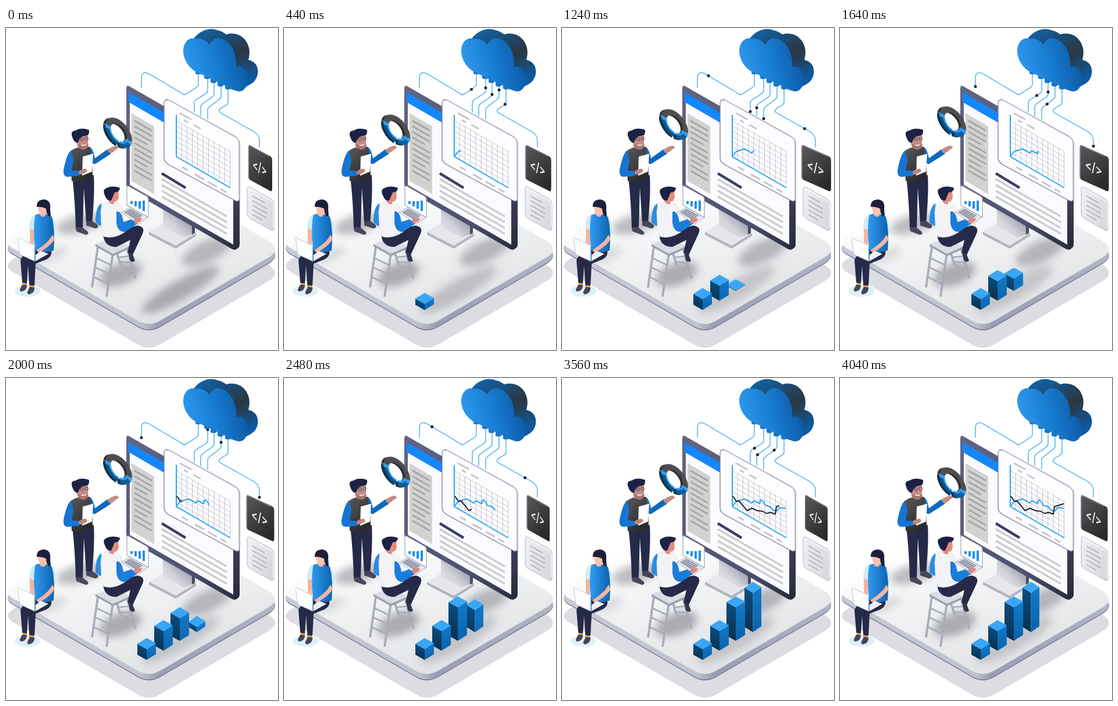
An HTML page for the animation above (4.08 s loop, 468x556 px).

```html
<!DOCTYPE html>
<html lang="en">
<head>
<meta charset="utf-8">
<title>Cloud analytics</title>
<style>
html, body { margin: 0; width: 100%; height: 100%; overflow: hidden; background: #fff; }
svg { display: block; width: 468px; height: 556px; }
.anim, .dot, .bar { animation: 4080ms linear infinite; }
.dot { fill: #1b1f2e; offset-rotate: 0deg; }
#ring { animation-name: bob; }
#card { animation-name: turn; transform-origin: 437.5px 240px; }
#castShadow { animation-name: fade; }
.plot { fill: none; stroke-width: 2; stroke-linejoin: round; stroke-dasharray: 100 110; }
#plotBlue { stroke: #2aa4f4; animation-name: drawBlue; }
#plotDark { stroke: #20222c; animation-name: drawDark; }
.wire { fill: none; stroke: #36a5ef; stroke-width: 1.3; }
@keyframes bob { 50% { transform: translateY(-24px); } }
@keyframes turn {
  0% { transform: scaleX(1); } 21.6% { transform: scaleX(1.17); }
  30.4%, 37% { transform: scaleX(1.24); } 49% { transform: scaleX(1.17); }
  60.8% { transform: scaleX(.97); } 76.5% { transform: scaleX(.8); }
  100% { transform: scaleX(1.14); }
}
@keyframes fade { 0% { opacity: .6; } 14%, 100% { opacity: .35; } }
@keyframes drawBlue { 0% { stroke-dashoffset: 101; } 76.5%, 100% { stroke-dashoffset: 0; } }
@keyframes drawDark { 0%, 43% { stroke-dashoffset: 101; } 92%, 100% { stroke-dashoffset: 0; } }
@keyframes grow1 {
  0%, 2.5% { transform: translateY(var(--h)); visibility: hidden; }
  2.51% { transform: translateY(var(--h)); visibility: visible; }
  17.2%, 100% { transform: none; visibility: visible; }
}
@keyframes grow2 {
  0%, 16% { transform: translateY(var(--h)); visibility: hidden; }
  16.01% { transform: translateY(var(--h)); visibility: visible; }
  34.8%, 100% { transform: none; visibility: visible; }
}
@keyframes grow3 {
  0%, 29.7% { transform: translateY(var(--h)); visibility: hidden; }
  29.71% { transform: translateY(var(--h)); visibility: visible; }
  58.3%, 100% { transform: none; visibility: visible; }
}
@keyframes grow4 {
  0%, 45.3% { transform: translateY(var(--h)); visibility: hidden; }
  45.31% { transform: translateY(var(--h)); visibility: visible; }
  73%, 100% { transform: none; visibility: visible; }
}
@keyframes outer {
  0%, 2.2% { offset-distance: 0%; } 40.7%, 49.8% { offset-distance: 100%; }
  88.2%, 100% { offset-distance: 0%; }
}
@keyframes innerA {
  0%, 2.5% { offset-distance: 0%; } 21.6% { offset-distance: 73%; } 30.4% { offset-distance: 98%; }
  49% { offset-distance: 14%; } 53%, 61% { offset-distance: 0%; }
  76.5% { offset-distance: 80%; } 82% { offset-distance: 100%; } 97%, 100% { offset-distance: 0%; }
}
@keyframes innerB {
  0%, 2.5% { offset-distance: 0%; } 22.5% { offset-distance: 94%; } 30.4% { offset-distance: 82%; }
  47%, 62% { offset-distance: 0%; } 76.5% { offset-distance: 62%; }
  84% { offset-distance: 100%; } 97%, 100% { offset-distance: 0%; }
}
@keyframes innerC {
  0%, 5% { offset-distance: 0%; } 21.6% { offset-distance: 62%; } 30.4% { offset-distance: 98%; }
  49% { offset-distance: 27%; } 57%, 61% { offset-distance: 0%; }
  76.5% { offset-distance: 98%; } 97%, 100% { offset-distance: 0%; }
}
</style>
</head>
<body>
<svg viewBox="0 0 468 556" xmlns="http://www.w3.org/2000/svg">
<defs>
  <linearGradient id="floor" x1=".2" y1="0" x2=".7" y2="1"><stop offset=".2" stop-color="#fff"/><stop offset=".55" stop-color="#eef0f1"/><stop offset="1" stop-color="#dfe1e4"/></linearGradient>
  <linearGradient id="slabSide"><stop offset="0" stop-color="#c9cad5"/><stop offset=".5" stop-color="#bfc1cd"/><stop offset=".56" stop-color="#9b9eb1"/><stop offset="1" stop-color="#b2b5c4"/></linearGradient>
  <linearGradient id="cloudFront" x1="0" y1=".6" x2="1" y2=".4"><stop offset="0" stop-color="#2f9bf0"/><stop offset=".45" stop-color="#1a80d6"/><stop offset="1" stop-color="#0a58a3"/></linearGradient>
  <linearGradient id="cloudBack" x1="0" y1="0" x2=".6" y2="1"><stop offset="0" stop-color="#0e68b4"/><stop offset=".35" stop-color="#1d4a70"/><stop offset=".6" stop-color="#2b3742"/><stop offset="1" stop-color="#0d5ba5"/></linearGradient>
  <linearGradient id="dark" x1="0" y1="0" x2=".6" y2="1"><stop offset="0" stop-color="#5a5a5c"/><stop offset="1" stop-color="#2a2a2d"/></linearGradient>
  <linearGradient id="note" x1="0" y1="0" x2="1" y2=".5"><stop offset="0" stop-color="#f1f1f4"/><stop offset="1" stop-color="#d9d9e0"/></linearGradient>
  <linearGradient id="neck" x1="1" y1="0" x2="0" y2="1"><stop offset="0" stop-color="#77788a"/><stop offset=".6" stop-color="#d2d2da"/><stop offset="1" stop-color="#ececf0"/></linearGradient>
  <linearGradient id="bezel" x1="0" y1="0" x2="1" y2="1"><stop offset="0" stop-color="#626684"/><stop offset=".7" stop-color="#4d5070"/><stop offset="1" stop-color="#262838"/></linearGradient>
  <linearGradient id="barSide" x1="0" y1="0" x2="0" y2="1"><stop offset="0" stop-color="#0a4d80"/><stop offset="1" stop-color="#09304e"/></linearGradient>
  <linearGradient id="barFront" x1="0" y1="0" x2="0" y2="1"><stop offset="0" stop-color="#1279cb"/><stop offset="1" stop-color="#0a63ab"/></linearGradient>
  <linearGradient id="vest"><stop offset="0" stop-color="#2f9bf0"/><stop offset="1" stop-color="#0f63b0"/></linearGradient>
  <filter id="soft" x="-40%" y="-60%" width="180%" height="220%"><feGaussianBlur stdDeviation="7"/></filter>
  <path id="slab" d="M18,384 L226,505 Q246,517 266,505 L452,396 Q474,382 452,368 L240,242 Q226,234 212,242 L18,355 Q-12,370 18,384Z"/>
</defs>

<!-- platform -->
<use href="#slab" y="41" fill="#dddce2"/>
<use href="#slab" y="11" fill="#6d7394"/>
<use href="#slab" y="9.5" fill="url(#slabSide)"/>
<use href="#slab" fill="url(#floor)"/>
<g fill="#808087" filter="url(#soft)">
  <ellipse cx="127" cy="338" rx="42" ry="16" opacity=".5" transform="rotate(-15 127 338)"/>
  <ellipse cx="197" cy="425" rx="38" ry="19" opacity=".6" transform="rotate(-20 197 425)"/>
  <ellipse cx="345" cy="386" rx="46" ry="18" opacity=".5" transform="rotate(-25 345 386)"/>
  <ellipse cx="80" cy="392" rx="28" ry="9" opacity=".25" transform="rotate(-25 80 392)"/>
  <ellipse id="castShadow" class="anim" cx="300" cy="452" rx="76" ry="17" transform-origin="300 452" style="rotate:-30deg"/>
</g>

<!-- monitor -->
<path d="M246,352 L283,330 L327,354 L292,376Z" fill="#e6e6ec"/>
<path d="M246,352 L292,376 L327,354 V359 L292,381 L246,357Z" fill="#b1b3c0"/>
<path d="M270,312 L320,341 V356 L306,362 L270,342Z" fill="url(#neck)"/>
<path d="M320,341 L325,344 V354 L320,357Z" fill="#4b4c60"/>
<path d="M211,100 L394,205 Q402,208 402,214 V374 Q402,380 394,383 Q390,383 386,380 L212,280 Q207,277 207,270 V106 Q207,98 211,100Z" fill="url(#bezel)"/>
<path d="M213,113 L391,216 V374 L213,271Z" fill="#fbfaff"/>
<path d="M211,111 L280,151 V168 L211,128Z" fill="#1487fa"/>
<path d="M216,147 L255,170 V287 L216,264Z" fill="#d2d2d1"/>
<g id="sideRows" stroke="#a3a3a4" stroke-width="2.6"/>
<g id="bodyRows" stroke="#cbcbcc" stroke-width="3.4"/>
<path d="M268,251 L309,276" stroke="#3b3f63" stroke-width="4.4"/>

<!-- floating chart -->
<path d="M272,131 Q272,121 281,124.500 L394,187 Q402,192 402,200 V292 Q402,302 394,298 L280,236 Q272,231 272,224Z" fill="#fdfdff" stroke="#70758f" stroke-width="1.2"/>
<path d="M276,126 Q278,123 283,126 L396,189 Q401,193 401,200 V294" fill="none" stroke="#bfc2d2" stroke-width="2"/>
<g stroke="#c6c6ca" stroke-width="3"><path d="M299,147 l20,11 M306,159 l7,4 M322,167 l13,7"/><path id="ticks"/></g>
<path id="grid" stroke="#adaeb8" stroke-width=".7"/>
<path d="M293,150 V222 L386,276" fill="none" stroke="#2aa4f4" stroke-width="2"/>
<path id="plotBlue" class="plot anim" pathLength="100" d="M293,222 L299,214 L306,211 L314,209 L322,213 L326,216 L330,212 L340,217 L342,210 L347,214 L350,220 L358,222 L364,229 L371,229 L374,224 L385,225"/>
<path id="plotDark" class="plot anim" pathLength="100" d="M294,204 L300,213 L304,212 L311,220 L313,222 L318,229 L327,225 L336,229 L345,230 L352,234 L359,232 L367,235 L369,222 L376,220 L385,217"/>

<!-- small cards -->
<path d="M415,278 Q415,272 420,275 L456,295 Q461,298 461,303 V346 Q461,352 456,349 L420,329 Q415,326 415,321Z" fill="url(#note)" stroke="#b4b6c3"/>
<path d="M418,281 Q418,276 423,279 L456,298 Q460,301 460,306 V344" fill="none" stroke="#f8f8fb" stroke-width="1.500"/>
<g id="noteRows" stroke="#b3b4ba" stroke-width="2"/>
<g id="wires"></g>
<g id="card" class="anim">
  <path d="M417,207 Q417,200.500 421,203 L454,221 Q458,223 458,228 V277 Q458,284 454,281 L421,263 Q417,261 417,256Z" fill="url(#dark)"/>
  <path d="M417.800,258 V208 Q417.800,202 422,204.500 L453,222" fill="none" stroke="#85858a"/>
  <text transform="matrix(.62 .33 0 1 436.500 249)" text-anchor="middle" font-family="Inter, 'Liberation Sans', sans-serif" font-size="23" font-weight="500" fill="#fff">&lt;/&gt;</text>
</g>
<g id="dots"></g>

<!-- cloud -->
<g id="plugs" fill="#1a75c9"/>
<path d="M322,20 C332,4 351,-2 364,4 C370,5 375,8 379,11 C396,6 412,15 417,31 C420,39 419,48 417,55 C430,58 435,68 433,80 C431,90 425,95 419,98 L399,109 L360,60Z" fill="url(#cloudBack)"/>
<path d="M305,40 C305,24 316,14 327,19 C336,17 345,22 350,29 C358,11 378,15 390,36 C395,46 397,58 396,68 C406,62 416,75 416,88 C416,102 408,112 398,109 C390,107 384,104 380,101 L330,77 C315,71 305,54 305,40Z" fill="url(#cloudFront)"/>

<!-- standing man -->
<path d="M114,256 L151,254 Q153,285 148,337 L138,337 L134,276 L132,347 L120,347 Q119,300 114,256Z" fill="#262a48"/>
<path d="M120,344 L131,344 L141,352 Q143,357 137,357 L121,351Z M138,334 L148,333 L158,340 Q160,346 153,346 L138,341Z" fill="#4a465a"/>
<path d="M141,205 Q149,204 153,225 L175,209 L181,217 L153,235 Q144,234 140,222Z" fill="#0f69bd"/>
<path d="M110,213 Q122,203 144,205 Q149,225 149,257 Q135,269 113,264Z" fill="url(#dark)"/>
<path d="M112,212 Q105,215 99,245 Q98,257 106,257 L126,255 L127,247 L113,246 L116,228Z" fill="#1675d2"/>
<path d="M132,222 L150,217 L148,248 L131,255Z" fill="#fff"/>
<path d="M125,248 q4,-5 13,-5 l2,4 q-6,6 -14,6Z" fill="#bd877c"/>
<path d="M122,186 H141 Q143,208 133,210 L124,207Z" fill="#c48c83"/>
<path d="M122,199 Q130,206 142,200 Q141,210 133,210 Q124,210 122,199Z" fill="#a9746e"/>
<path d="M130,202 q5,2 8,-1" stroke="#fff" stroke-width="1.500" fill="none"/>
<path d="M114,188 Q110,178 120,177 Q129,171 143,176 Q144,186 137,186 Q128,187 126,193 L123,199 Q116,196 114,188Z" fill="#1c2146"/>
<path d="M128,192 a2.700,2.700 0 1 0 5.400,0 a2.700,2.700 0 1 0 -5.400,0 M136,191 a2.700,2.700 0 1 0 5.400,0 a2.700,2.700 0 1 0 -5.400,0" fill="none" stroke="#463a48" stroke-width=".9"/>

<!-- ring chart -->
<g id="ring" class="anim"><g transform="matrix(1 .56 0 1 194 181)" fill="none" stroke-width="9">
  <g transform="translate(-4 3)"><path id="ringTopBack" stroke="#2c2c2f"/><path id="ringLeftBack" stroke="#07304c"/><path id="ringRightBack" stroke="#07304d"/></g>
  <path id="ringTop" stroke="#4e4e50"/><path id="ringLeft" stroke="#0d5388"/><path id="ringRight" stroke="#0f5c97"/>
  <g stroke="#2ba0f7"><path id="tipLeft"/><path id="tipRight"/><path id="rim" stroke-width="3"/></g>
</g></g>
<path d="M174,211 Q180,205 190,203 L195,206 L188,211 Q184,216 178,216Z" fill="#c48c83"/>

<!-- stool and seated man -->
<g fill="none" stroke="#a9abba" stroke-width="3.8">
  <path d="M190,386 L197,409 M208,379 L223,433"/>
  <path d="M193,396 L213,394 M195,404 L216,405 M197,409 L219,418" stroke-width="2.400"/>
  <path d="M158,378 L148,448 M184,388 L173,464"/>
  <path d="M155,397 L180,409 M153,413 L178,425 M151,430 L176,442" stroke-width="2.800"/>
</g>
<path d="M154,373 L186,361 L213,377 L184,390Z" fill="#dcdce4"/>
<path d="M154,373 L184,390 L213,377 V381 L184,394 L154,377Z" fill="#9c9fae"/>
<path d="M167,355 L200,348 L226,341 Q240,343 235,355 L218,392 L209,388 L214,366 L190,378 Q168,378 167,355Z" fill="#262a48"/>
<path d="M210,386 L218,391 L222,402 Q218,406 213,401Z" fill="#34344c"/>
<path d="M164,303 Q154,308 154,336 L162,342 L170,336Z" fill="#2a8de2"/>
<path d="M165,304 C178,295 196,299 199,311 L205,352 Q186,365 168,360 C163,345 164,330 163,318Z" fill="#f3f3f6" stroke="#dfe0e8" stroke-width=".8"/>
<path d="M190,317 Q199,315 202,335 L222,328 L226,338 L205,352 Q192,353 190,336Z" fill="#1b7ddb"/>
<path d="M198,318 L214,309 L245,327 L228,339Z" fill="#e4e5ec" stroke="#a6a9b9" stroke-width=".8"/>
<path d="M203,318 L214,312 L235,324 L224,331Z" fill="#8d91a5"/>
<path id="keys" stroke="#e4e5ec" stroke-width=".8"/>
<path d="M220,331 Q228,326 234,329 L232,334 L222,338Z" fill="#e0887c"/>
<path d="M208,275 Q208,271 211,273 L243,291 Q245,293 245,296 V327 L208,306Z" fill="#fff" stroke="#9da1b4" stroke-width="1.200"/>
<path id="miniBars" stroke="#2490ea" stroke-width="4"/>
<path d="M175,284 L193,280 L194,293 L191,299 L186,300 V304 Q178,305 176,298Z" fill="#e08d80"/>
<path d="M171,291 Q165,279 172,277 Q182,271 196,276 Q196,283 187,284 L184,291 L181,298 Q174,299 171,291Z" fill="#1c2146"/>

<!-- seated woman -->
<ellipse cx="37" cy="454" rx="22" ry="10" fill="#dcf0f6"/>
<path d="M29,438 h7 v6 h-7Z M40,443 h8 v6 h-8Z" fill="#e9a63a"/>
<path d="M28,443 L36,444 Q36,454 26,455 Q22,453 25,449Z M41,447 L49,448 Q50,457 40,460 Q35,459 37,455Z" fill="#47435a"/>
<path d="M50,383 L78,384 Q80,396 66,401 L51,407 L49,445 L40,444 L38,410 L36,441 L28,440 L25,402 Q25,392 50,383Z" fill="#262a48"/>
<path d="M49,323 Q40,325 40,346 L51,350Z M77,325 Q87,332 88,352 L78,360Z" fill="#d2ecf5"/>
<path d="M41,346 L49,349 L48,375 L41,371Z" fill="#f2b5a3"/>
<path d="M50,323 Q63,317 79,326 Q85,350 82,384 Q66,391 50,382 Q46,350 50,323Z" fill="url(#vest)"/>
<path d="M58,316 h10 v8 q-5,5 -10,-1Z" fill="#eaa795"/>
<path d="M55,306 H71 Q73,323 63,324 Q55,321 55,306Z" fill="#f8c0b0"/>
<path d="M53,309 Q52,297 65,296 Q78,297 76,313 L77,325 Q70,327 69,312 Q60,308 53,309Z" fill="#1b1f3a"/>
<path d="M80,357 L84,364 Q78,376 56,388 L52,384 Q68,373 74,366Z" fill="#f2b5a3"/>
<path d="M48,394 L60,385 L73,390 L50,403Z" fill="#eef0f5"/>
<path d="M20,364 Q20,361 23,363 L48,375 Q50,376 50,379 V403 L24,391Z" fill="#fcfdff" stroke="#b9c3d3" stroke-width=".9"/>
<path d="M50,378 V403" stroke="#2f78b4" stroke-width="1.500"/>

<g id="bars"></g>
</svg>
<script>
const byId = id => document.getElementById(id);
const setPath = (id, d) => byId(id).setAttribute("d", d);
const add = (id, markup) => byId(id).insertAdjacentHTML("beforeend", markup);
const times = (n, fn) => Array.from({ length: n }, (_, i) => fn(i)).join(" ");
const slope = 0.575;

// Parallel text rows
function rows(id, x, y, count, gap, width) {
  add(id, `<path d="${times(count, i => {
    const w = width(i);
    return `M${x},${y + i * gap} l${w},${w * slope}`;
  })}"/>`);
}
rows("sideRows", 221, 160, 10, 9.6, i => i % 4 === 3 ? 22 : 30);
rows("bodyRows", 268, 261, 4, 10, i => 112);
rows("noteRows", 424, 290, 5, 8, i => [21, 25, 25, 25, 17][i]);

setPath("ticks", times(4, i => `M${303 + i * 22},${240 + i * 12.6} l${i % 3 ? 16 : 10},${i % 3 ? 9 : 5.7}`));
setPath("grid",
  times(10, i => `M${302 + i * 9.3},${165 + i * 5.3} V${227 + i * 5.4}`) +
  times(7, i => `M293,${160 + i * 9} l93,53.5`));
setPath("keys", times(3, i => `M${205.5 + i * 3},${316.6 - i * 1.7} l21,12`));
setPath("miniBars", times(4, i => `M${216 + i * 7},${304 + i * 4} v${-[5, 9, 13, 18][i]}`));

// Ring segments, angles in degrees clockwise from the right
function arc(from, to, r = 18.5) {
  const at = a => [Math.cos(a * Math.PI / 180) * r, Math.sin(a * Math.PI / 180) * r].map(v => v.toFixed(2));
  return `M${at(from)} A${r},${r} 0 ${to - from > 180 ? 1 : 0} 1 ${at(to)}`;
}
const segments = { Top: [192, 368], Right: [10, 84], Left: [92, 190] };
for (const [name, [from, to]] of Object.entries(segments)) {
  setPath("ring" + name, arc(from, to));
  setPath("ring" + name + "Back", arc(from, to));
}
setPath("tipLeft", arc(172, 190));
setPath("tipRight", arc(10, 27));
setPath("rim", arc(10, 84, 15) + arc(92, 180, 15));

// Cables with travelling dots
const cables = [
  ["outer", "M331,74 V97 Q331,101 327,103 L310,114 Q306,117 302,112.500 L246,79 Q233,73 233,87 V103"],
  ["innerA", "M347,78 V108 Q347,111 344,113 L327,124 Q324,126 324,130 V146"],
  ["innerB", "M358,84 V114 Q358,117 355,119 L338,131 Q335,133 335,137 V152"],
  ["innerC", "M370,90 V118 Q370,121 367,123 L350,136 Q347,138 347,142 V158"],
  ["outer", "M382,98 V128 Q382,131 379,133 L369,139 Q364,143 369,146.500 L425,178 Q436,184 436,195 V206"]
];
for (const [name, d] of cables) {
  add("wires", `<path class="wire" d="${d}"/>`);
  add("dots", `<circle class="dot" r="2.5" style="animation-name:${name};offset-path:path('${d}')"/>`);
}
[[331, 69], [346, 77], [357, 84], [369, 90], [382, 95]].forEach(([x, y]) =>
  add("plugs", `<rect x="${x - 5}" y="${y}" width="10" height="11" rx="3"/>`));

// Bars rise through a mask cut along their footprint
const bars = [[226, 478, 32, 19], [255, 462, 32, 34], [283, 445, 32, 58], [314, 430, 29, 68]];
bars.map((bar, i) => [...bar, i + 1]).reverse().forEach(([x, y, w, h, n]) => {
  const mid = x + w / 2, right = x + w, top = y - h;
  const face = (points, fill) => `<polygon points="${points}" fill="${fill}"/>`;
  add("bars", `<clipPath id="foot${n}"><polygon points="${x},0 ${x},${y} ${mid},${y + 9} ${right},${y - 1} ${right},0"/></clipPath>
    <g clip-path="url(#foot${n})"><g class="bar" style="--h:${h}px;animation-name:grow${n}">
    ${face(`${x},${top} ${mid},${top + 9} ${mid},${y + 9} ${x},${y}`, "url(#barSide)")}
    ${face(`${mid},${top + 9} ${right},${top - 1} ${right},${y - 1} ${mid},${y + 9}`, "url(#barFront)")}
    ${face(`${x},${top} ${mid},${top - 10} ${right},${top - 1} ${mid},${top + 9}`, "#39a7f5")}
    </g></g>`);
});
</script>
</body>
</html>
```
